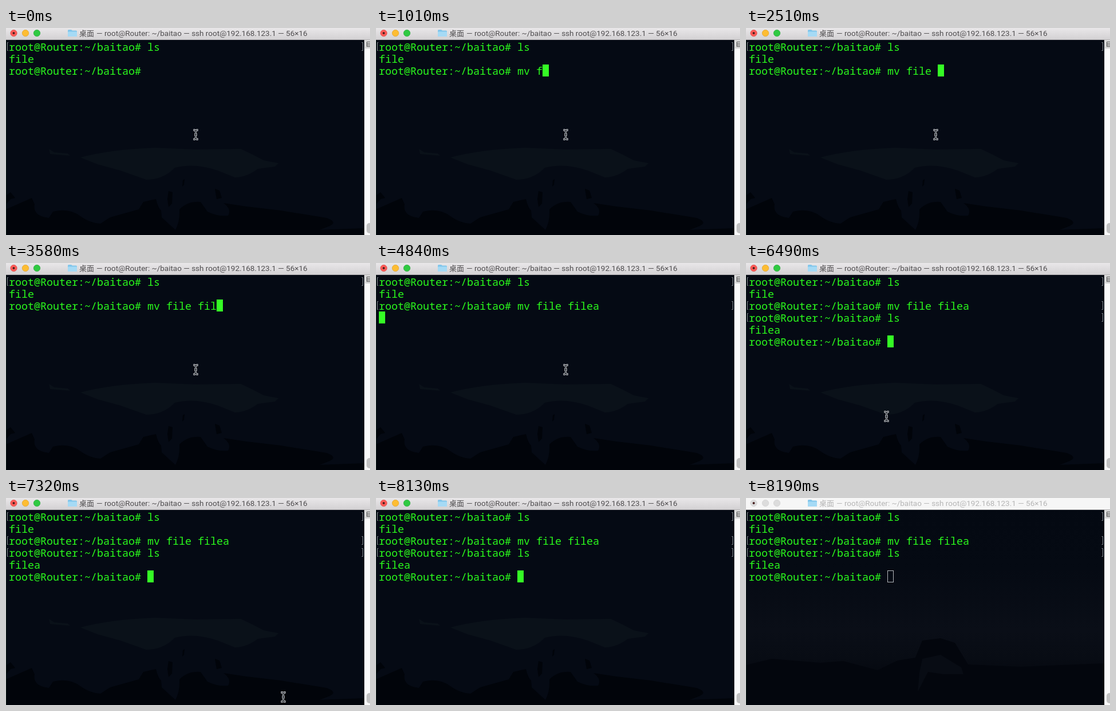
Write an HTML page that moves like this. It is 636 by 363 pixels and loops after 8.35 s.

```html
<!DOCTYPE html>
<html lang="en">
<head>
<meta charset="utf-8">
<title>Terminal</title>
<style>
  html, body { margin: 0; width: 100%; height: 100%; overflow: hidden; background: #050a14; }
  svg { display: block; width: 636px; height: 363px; }
  .line { font: 500 18.333px "Noto Sans Mono", "DejaVu Sans Mono", monospace; fill: #2bfb1c; white-space: pre; }
  .title { font: 13.5px Roboto, Inter, sans-serif; fill: #504e50; }
  .title .cjk { font: 13px "Noto Sans CJK SC", "Noto Sans CJK", sans-serif; }
  .mark { fill: none; stroke: #858a8e; }
  .inactive .title { fill: #b5b5b5; }
  .inactive .light { fill: #dcdcdc; stroke: #cfcfcf; }
  .inactive #bar { fill: #f6f6f6; }
  .inactive #cursor { fill: none; stroke: #b4b8bc; }
  #cursor { fill: #35fb25; }
  #blurred, .inactive #scene { display: none; }
  .inactive #blurred { display: inline; }
</style>
</head>
<body>
<svg id="stage" viewBox="0 0 636 363">
  <defs>
    <linearGradient id="chrome" x2="0" y2="1">
      <stop stop-color="#e9e7e9"/><stop offset="1" stop-color="#d2d0d2"/>
    </linearGradient>
    <linearGradient id="night" x2="0" y2="1">
      <stop stop-color="#040912"/><stop offset=".3" stop-color="#050a13"/>
      <stop offset=".62" stop-color="#0a0e17"/><stop offset=".76" stop-color="#080c14"/>
      <stop offset=".9" stop-color="#03060d"/><stop offset="1" stop-color="#010308"/>
    </linearGradient>
  </defs>

  <rect width="636" height="363" fill="#050a14"/>
  <g id="scene">
    <path fill="#0a1119" d="M130 227Q180 213 260 210L330 213 410 212Q432 222 450 232L476 237 470 243 440 247Q420 262 400 262L370 250Q330 236 295 245 275 266 245 266L200 250 160 239Z"/>
    <path fill="#0a1119" d="M75 212L84 218 108 220 112 224 88 222 77 221Z"/>
    <g fill="#01040a">
      <path d="M0 318L45 298 50 309Q46 330 75 333L82 322Q110 315 130 330 146 342 165 343L182 332 232 318 240 305 262 300Q266 316 271 320L272 332 296 354Q304 340 303 318 318 303 340 305L352 322Q370 331 388 329 395 318 380 307L420 313 480 320 560 333Q580 340 566 347L548 354 626 351V363H0Z"/>
      <path d="M284 286L291 288 290 308 284 314 282 300Z"/>
      <path d="M365 282L373 285 377 298 368 300Z"/>
      <path d="M309 267L312 265 311 275 308 278Z"/>
      <path d="M1 293L8 288 16 298 8 300 1 308Z"/>
    </g>
  </g>
  <g id="blurred">
    <rect y="20" width="636" height="343" fill="url(#night)"/>
    <path fill="#03060d" d="M0 293L45 282 130 289 170 286 230 302 265 285 296 280 308 250 340 246 365 254 388 292 480 296 626 290V363H0Z"/>
    <path fill="#080c14" d="M303 306L308 282 340 275 376 297 380 309 345 309 318 305 300 340Z"/>
  </g>
  <path d="M.5 21V363" stroke="#0b1a16"/>

  <g id="screen"></g>
  <rect id="cursor"/>

  <rect x="626" y="20" width="10" height="343" fill="#fafafa"/>
  <path d="M626.5 21V363" stroke="#e4e4e4"/>
  <rect x="627" y="21" width="9" height="15" fill="#d8d8d8"/>
  <path d="M636 24.5H630.500V32.500H636M631 27.500H636M631 30H636" fill="none" stroke="#555"/>
  <rect x="630" y="342" width="12" height="18" rx="5" fill="#c2c2c2"/>

  <rect id="bar" width="636" height="21" fill="url(#chrome)"/>
  <path d="M0 20.500H636" stroke="#b5b3b5"/>
  <g stroke-width=".7">
    <circle class="light" cx="13.500" cy="9" r="5.700" fill="#fc5b57" stroke="#df443f"/>
    <circle class="light" cx="34" cy="9" r="5.700" fill="#fdbd33" stroke="#de9f2c"/>
    <circle class="light" cx="54" cy="9" r="5.700" fill="#2fc941" stroke="#25aa35"/>
  </g>
  <circle cx="13.500" cy="9" r="2" fill="#46201f"/>
  <path d="M108 4.500Q108 3 109.500 3H114L116 4.500H122.500Q124 4.500 124 6V14Q124 15 123 15H109Q108 15 108 14Z" fill="#82c6ea"/>
  <rect x="108" y="6.500" width="16" height="8.500" rx="1" fill="#a5daf5"/>
  <text class="title" y="14"><tspan class="cjk" x="128">桌面</tspan><tspan x="158">— root@Router: ~/baitao — ssh root@192.168.123.1 — 56×16</tspan></text>

  <g id="pointer" fill="none">
    <path id="beam" d="M-4 -8H-2.500Q0 -8 0 -5.500V5.500Q0 8 -2.500 8H-4M4 -8H2.500Q0 -8 0 -5.500M0 5.500Q0 8 2.500 8H4M-2.500 0H2.500" stroke="#d9dbdd" stroke-width="3"/>
    <use href="#beam" style="stroke:#05080f"/>
    <path d="M-4 -8H-2.500Q0 -8 0 -5.500V5.500Q0 8 -2.500 8H-4M4 -8H2.500Q0 -8 0 -5.500M0 5.500Q0 8 2.500 8H4M-2.500 0H2.500" stroke="#070b12" stroke-width="1.200"/>
  </g>
</svg>
<script>
const LOOP = 8350, PROMPT = 'root@Router:~/baitao# ';
const LEFT = 5, TOP = 22, CELL = 11, ROW = 21;
const $ = id => document.getElementById(id);

const moveKeys = [290, 530, 770, 1010, 1430, 1670, 1850, 2510, 2750, 3110, 3580, 4000, 4420];
const listKeys = [6200, 6320];
const cursorOff = [[0, 240], [5490, 6200], [7660, 8130]];

// Time and centre; an entry without a centre hides the pointer.
const pointerPath = [
  [0, 331, 187],
  [5440, 322, 196], [5490, 300, 216], [5550, 272, 244], [5600, 252, 263], [5660, 245, 269],
  [6970, 248, 288], [7030, 267, 347], [7080],
  [7320, 484, 349], [7370, 511, 345], [7430, 537, 342],
  [7610, 549, 351], [7660, 554, 358], [7720]
];

const typed = (text, keys, t) => text.slice(0, keys.filter(k => k <= t).length);

function linesAt(t) {
  const lines = [PROMPT + 'ls', 'file', PROMPT + typed('mv file filea', moveKeys, t)];
  if (t >= 4840) lines.push(t >= 4900 ? PROMPT + typed('ls', listKeys, t) : '');
  if (t >= 6490) lines.push('filea', PROMPT);
  else if (t >= 6430) lines.push('');
  return lines;
}

function lineMarkup(text, row, lines) {
  const y = TOP + row * ROW;
  const entered = text.startsWith(PROMPT) && row < lines.length - 1;
  const marks = entered
    ? `<path class="mark" d="M4 ${y + 3.5}H2.500V${y + 17.5}H4M621.500 ${y + 3.5}H623.500V${y + 17.5}H621.500"/>` : '';
  return `${marks}<text class="line" x="${LEFT}" y="${y + 17.5}">${text}</text>`;
}

let shown = '';
function draw(now) {
  const t = now % LOOP;
  const lines = linesAt(t), last = lines.length - 1;
  const inactive = t >= 8190;

  const markup = lines.map(lineMarkup).join('');
  if (markup !== shown) $('screen').innerHTML = shown = markup;
  $('stage').classList.toggle('inactive', inactive);

  const inset = inactive ? .5 : 0;
  const cursor = {
    x: LEFT + lines[last].length * CELL + inset,
    y: TOP + last * ROW + inset,
    width: CELL - 2 * inset,
    height: ROW - 2 * inset,
    visibility: cursorOff.some(([from, to]) => t >= from && t < to) ? 'hidden' : 'visible'
  };
  for (const name in cursor) $('cursor').setAttribute(name, cursor[name]);

  const [, x, y] = pointerPath.filter(p => p[0] <= t).pop();
  $('pointer').setAttribute('visibility', x ? 'visible' : 'hidden');
  if (x) $('pointer').setAttribute('transform', `translate(${x + .5} ${y})`);
}

const start = performance.now();
function tick() {
  draw(performance.now() - start);
  requestAnimationFrame(tick);
}
tick();
</script>
</body>
</html>
```
